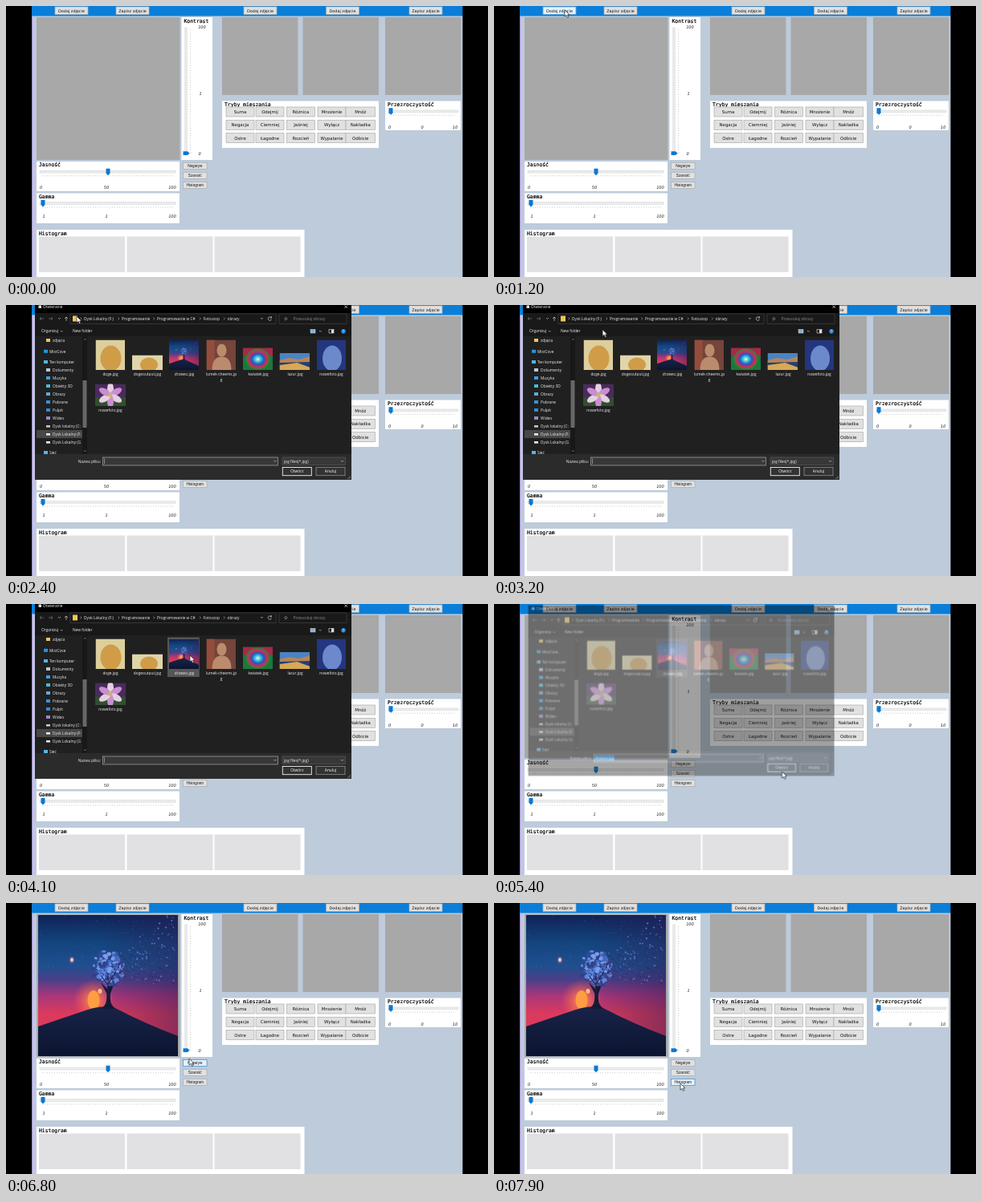
These frames come from a looping animation (600 px wide and 338 px high, 8 s). An HTML page:

```html
<!DOCTYPE html>
<html lang="pl">
<head>
<meta charset="utf-8">
<title>Edytor zdjęć</title>
<style>
html, body { margin: 0; width: 100%; height: 100%; overflow: hidden; background: #000; }
svg { display: block; }
#stage { width: 100vw; height: 100vh; }
text { white-space: pre; }
.wide { font-family: "DejaVu Sans", sans-serif; }
.ui { font-family: "Liberation Sans", Arial, sans-serif; }
.dlg { font-family: "Open Sans", "Noto Sans", sans-serif; }
.mono { font: 6.4px "DejaVu Sans Mono", monospace; stroke: #000; stroke-width: .2; }
.btn { fill: #e1e1e1; stroke: #adadad; stroke-width: .7; }
.scale { font: italic 5.1px "DejaVu Sans", sans-serif; fill: #222; }

/* one loop is 8 s: 1% = 80 ms */
#dialog, #cursor, #photo, #pick, #filename, .hot { animation: 8s linear infinite; }
#dialog { animation-name: dialog; transform-origin: 233px 108px; }
#cursor { animation-name: cursor; animation-timing-function: ease-in-out; }
#photo { animation-name: photo; animation-timing-function: step-end; }
#pick { animation-name: pick; animation-timing-function: step-end; }
#filename { animation-name: filename; animation-timing-function: step-end; }
.hot { fill: #e5f1fb; stroke: #3a93dc; stroke-width: .7; opacity: 0; animation-timing-function: step-end; }
#hot-add { animation-name: hot-add; }
#hot-neg { animation-name: hot-neg; }
#hot-gray { animation-name: hot-gray; }
#hot-hist { animation-name: hot-hist; }

@keyframes dialog {
  0%, 18.75% { opacity: 0; transform: scale(.94); }
  21%, 66.25% { opacity: 1; transform: none; }
  67.5% { opacity: .43; transform: scale(.967); }
  68.75%, 100% { opacity: 0; transform: scale(.935); }
}
@keyframes cursor {
  0%, 6% { transform: translate(150px, -14px); }
  12%, 22% { transform: translate(88px, 5px); }
  28%, 36% { transform: translate(88px, 14px); }
  46%, 54% { transform: translate(229px, 64px); }
  63%, 68.75% { transform: translate(358.5px, 209px); }
  80%, 87% { transform: translate(228px, 194px); }
  95%, 100% { transform: translate(232px, 225px); }
}
@keyframes photo { 0% { opacity: 0; } 70%, 100% { opacity: 1; } }
@keyframes pick {
  0% { opacity: 0; fill: #565656; }
  45.5% { opacity: 1; fill: #565656; }
  53%, 100% { opacity: 1; fill: #333; }
}
@keyframes filename { 0% { opacity: 0; } 53%, 100% { opacity: 1; } }
@keyframes hot-add { 0% { opacity: 0; } 11% { opacity: 1; } 19%, 100% { opacity: 0; } }
@keyframes hot-neg { 0% { opacity: 0; } 78.5% { opacity: 1; } 91%, 100% { opacity: 0; } }
@keyframes hot-gray { 0% { opacity: 0; } 91% { opacity: 1; } 93%, 100% { opacity: 0; } }
@keyframes hot-hist { 0% { opacity: 0; } 93%, 100% { opacity: 1; } }
</style>
</head>
<body>
<svg id="stage" viewBox="0 0 600 338" preserveAspectRatio="none">
  <defs>
    <linearGradient id="sky" x1="0" y1="0" x2="0" y2="1">
      <stop offset="0" stop-color="#0f2358"/>
      <stop offset=".2" stop-color="#14457f"/>
      <stop offset=".36" stop-color="#1f4f8e"/>
      <stop offset=".46" stop-color="#4b3f88"/>
      <stop offset=".57" stop-color="#a8367a"/>
      <stop offset=".7" stop-color="#dc3a5c"/>
    </linearGradient>
    <linearGradient id="dusk">
      <stop offset=".45" stop-color="#2a1c52" stop-opacity="0"/>
      <stop offset="1" stop-color="#2a1c52" stop-opacity=".45"/>
    </linearGradient>
    <linearGradient id="hill" x1="0" y1="0" x2="0" y2="1">
      <stop offset="0" stop-color="#182348"/>
      <stop offset="1" stop-color="#0c1430"/>
    </linearGradient>
    <radialGradient id="glow">
      <stop offset="0" stop-color="#ff9a52"/>
      <stop offset="1" stop-color="#ff5a50" stop-opacity="0"/>
    </radialGradient>
    <radialGradient id="bloom">
      <stop offset="0" stop-color="#f4f6d0"/>
      <stop offset=".25" stop-color="#38c4d8"/>
      <stop offset=".5" stop-color="#2356c4"/>
      <stop offset=".75" stop-color="#d12b50"/>
      <stop offset="1" stop-color="#1f8a3d"/>
    </radialGradient>
    <symbol id="scene" viewBox="0 0 174 176" preserveAspectRatio="none"></symbol>
  </defs>
  <g id="app"></g>
  <g id="dialog"></g>
  <path id="cursor" d="M0 0V8.2L2 6.4L3.4 9.4L4.8 8.8L3.5 5.9H6Z" fill="#fff" stroke="#222" stroke-width=".7"/>
  <path d="M0 0H32V338H0ZM568.4 0H600V338H568.4Z"/>
</svg>
<script>
const $ = id => document.getElementById(id);

const rect = (x, y, w, h, attrs = '') =>
  `<rect x="${x}" y="${y}" width="${w}" height="${h}" ${attrs}/>`;
const fill = (x, y, w, h, color) => rect(x, y, w, h, `fill="${color}"`);
const path = (d, attrs) => `<path d="${d}" ${attrs}/>`;
const line = (d, color, width = .7) =>
  path(d, `fill="none" stroke="${color}" stroke-width="${width}"`);
const ellipse = (x, y, rx, ry, color, attrs = '') =>
  `<ellipse cx="${x}" cy="${y}" rx="${rx}" ry="${ry}" fill="${color}" ${attrs}/>`;
const text = (s, x, y, cls, size, color = '#111', anchor = 'start') =>
  `<text x="${x}" y="${y}" class="${cls}" font-size="${size}" fill="${color}" text-anchor="${anchor}">${s}</text>`;
const mono = (s, x, y) => `<text x="${x}" y="${y}" class="mono">${s}</text>`;
const mark = (s, x, y) => `<text x="${x}" y="${y}" class="scale" text-anchor="middle">${s}</text>`;

function button(label, x, y, w, h, cls, size, hot) {
  return rect(x, y, w, h, 'class="btn"') +
    (hot ? rect(x, y, w, h, `class="hot" id="${hot}"`) : '') +
    text(label, x + w / 2, y + h / 2 + size * .36, cls, size, '#111', 'middle');
}

function slider(x1, x2, y, knob, marks, baseline, first = x1 + 1.5) {
  const places = [first, (x1 + x2) / 2 - 1.5, x2 - 4];
  return rect(x1, y - 1.2, x2 - x1, 2.4, 'fill="#eceeee" stroke="#d2d4d6" stroke-width=".6"') +
    path(`M${x1 + 3} ${y + 5}H${x2 - 3}`, 'stroke="#c4c4c4" stroke-width=".9" stroke-dasharray="1 2"') +
    path(`M${knob - 2.5} ${y - 4}h5v6l-2.5 2.5l-2.5 -2.5z`, 'fill="#0a78d2"') +
    marks.map((m, i) => mark(m, places[i], baseline)).join('');
}

function random(seed) {
  return () => (seed = seed * 16807 % 2147483647) / 2147483647;
}

function scene() {
  const rnd = random(4127);
  const many = (n, dot) => Array.from({ length: n }, dot).join('');
  const any = list => list[Math.floor(rnd() * list.length)];
  const stars = many(80, () =>
    ellipse(rnd() * 174, rnd() * 75, .45, .45, '#6fa6dc', `opacity="${.3 + rnd() * .5}"`));
  const drift = many(230, () => {
    const t = rnd(), r = .4 + rnd() * .7;
    return ellipse(98 + t * 72, 66 - t * 26 + (rnd() - .5) * (30 + t * 70), r, r,
      any(['#5f78c4', '#2a2f66', '#4a3f80']));
  });
  const crown = many(170, () => {
    const a = rnd() * 6.283, d = Math.sqrt(rnd());
    return ellipse(87 + Math.cos(a) * d * 19, 66 + Math.sin(a) * d * 22, 1.3 + rnd() * 2, 1.2 + rnd() * 1.8,
      any(['#2f4a98', '#4468bc', '#5f86dc', '#7c9cec', '#343f86']));
  });
  return fill(0, 0, 174, 176, 'url(#sky)') + fill(0, 0, 174, 176, 'url(#dusk)') + stars +
    ellipse(42, 56, 3.5, 4.5, '#e06c9c', 'opacity=".3"') + ellipse(42, 56, 1.8, 2.4, '#ffcfc6') +
    ellipse(69, 107, 26, 27, 'url(#glow)') + ellipse(69, 106, 7.5, 12, '#ff9d43') +
    ellipse(77, 95, 2.5, 3, '#ffc075') +
    path('M0 139Q35 127 62 118Q84 111 98 117Q130 134 174 151V176H0Z', 'fill="url(#hill)"') +
    path('M78 117Q87 112 85 97L78 84L86 92L87 70L89 90L97 78L90 98Q88 112 97 117Z', 'fill="#141936"') +
    crown + line('M87 100V72M87 88L78 75M88 85L97 70', '#1d2450', 1.1) + drift;
}

function app() {
  let s = fill(32, 0, 537, 338, '#bdcbdb') + fill(32, 0, 537, 12.5, '#0a7ed8') +
    fill(32, 12.5, 1, 326, '#a886d4');

  [['Dodaj zdjęcie', 61, 'hot-add'], ['Zapisz zdjęcie', 137], ['Dodaj zdjęcie', 296],
   ['Dodaj zdjęcie', 398.5], ['Zapisz zdjęcie', 502]].forEach(([label, x, hot]) => {
    s += button(label, x, 1, 41, 9.6, 'wide', 4.9, hot);
  });

  s += fill(38, 14, 178.5, 178, '#a8a8a8');
  [269, 369.5, 472].forEach(x => s += fill(x, 14, 94.5, 97, '#a8a8a8'));
  s += '<use id="photo" href="#scene" x="40" y="15" width="174" height="176"/>';

  s += fill(218.5, 14, 38.5, 178, '#fff') + mono('Kontrast', 221.5, 21) +
    rect(222.8, 27, 2.4, 159, 'fill="#eceeee" stroke="#d2d4d6" stroke-width=".6"') +
    path('M229.5 29V183', 'stroke="#c4c4c4" stroke-width=".9" stroke-dasharray="1 2"') +
    path('M220.5 181.3h5.5l2.6 2.4l-2.6 2.4h-5.5z', 'fill="#0a78d2"') +
    mark('100', 244, 27.5) + mark('1', 242, 110.5) + mark('0', 241, 186);

  s += fill(38, 194, 178, 37, '#fff') + mono('Jasność', 41, 200) +
    slider(42, 211, 206.8, 127, [0, 50, 100], 228);
  s += fill(38, 233.5, 178, 37.5, '#fff') + mono('Gamma', 41, 239.5) +
    slider(42, 211, 246, 46, [1, 1, 100], 264, 47);

  [['Negatyw', 'neg'], ['Szarość', 'gray'], ['Histogram', 'hist']].forEach(([label, id], i) => {
    s += button(label, 220.5, 195.5 + i * 12, 29.5, 8, 'ui', 4.7, 'hot-' + id);
  });

  s += fill(38, 279, 333.5, 59, '#fff') + mono('Histogram', 41, 285.5);
  [41, 150.5, 259.5].forEach(x => s += fill(x, 287.5, 107, 44.5, '#e1e0e2'));

  s += fill(269, 118.5, 195, 58.5, '#fff') + mono('Tryby mieszania', 272, 125);
  const columns = [274, 311, 349.5, 388, 423];
  ['Suma Odejmij Różnica Mnożenie Mnóż', 'Negacja Ciemniej Jaśniej Wyłącz Nakładka',
   'Ostre Łagodne Rozcień Wypalanie Odbicie'].forEach((row, r) =>
    row.split(' ').forEach((label, c) => {
      s += button(label, columns[c], 126 + r * 16.3, c === 4 ? 36.5 : 35, 12, 'wide', 5.4);
    }));

  return s + fill(472, 118.5, 94, 36.5, '#fff') + mono('Przezroczystość', 475, 125) +
    slider(476, 563, 131.2, 479, [0, 0, 10], 153);
}

const thumb = (x, y, w, h, art) =>
  `<svg x="${x}" y="${y}" width="${w}" height="${h}" viewBox="0 0 ${w} ${h}">${art}</svg>`;

function thumbs() {
  const petals = [0, 60, 120, 180, 240, 300].map(a =>
    ellipse(19, 6, 4, 8, a % 120 ? '#c98fd0' : '#e6cfe4', `transform="rotate(${a} 19 14)"`)).join('');
  return thumb(111.5, 43.5, 36.5, 37.5, fill(0, 0, 37, 38, '#dccf9c') + ellipse(19, 23, 13, 16, '#d09c48')) +
    thumb(157, 62.5, 38, 18.5, fill(0, 0, 38, 19, '#e0d4aa') + ellipse(21, 12, 11, 9, '#d09c48')) +
    '<use href="#scene" x="203" y="44" width="37" height="37"/>' +
    thumb(249.5, 43.5, 36.5, 37.5, fill(0, 0, 37, 38, '#75443a') + fill(0, 0, 10, 38, '#934d3c') +
      ellipse(19, 13, 6, 8, '#bb8b6e') + path('M7 38Q7 21 19 21T31 38Z', 'fill="#bb8b6e"')) +
    thumb(295, 53.5, 37, 27.5, fill(0, 0, 37, 28, '#197a3a') + fill(0, 0, 37, 10, '#a92848') +
      ellipse(18.5, 14, 15, 13, 'url(#bloom)')) +
    thumb(340.5, 60, 37.5, 21, fill(0, 0, 38, 21, '#4a83c5') + path('M0 9L12 6L24 8L38 4V14H0Z', 'fill="#b98455"') +
      path('M0 12L38 11V21H0Z', 'fill="#243f78"') + path('M0 15L22 12L38 18V21H0Z', 'fill="#d6a858"')) +
    thumb(387, 43.5, 36, 37.5, fill(0, 0, 36, 38, '#23367e') + ellipse(19, 23, 12, 16, '#6c89cc')) +
    thumb(111, 98.5, 38, 27.5, fill(0, 0, 38, 28, '#4a2b5c') + fill(0, 17, 38, 11, '#31502e') +
      petals + ellipse(19, 14, 2.5, 2.5, '#c5bd4a'));
}

function dialog() {
  const t = (s, x, y, color = '#eee', anchor) => text(s, x, y, 'dlg', 4.8, color, anchor);
  let s = fill(36, -2, 394, 220, '#202020') + fill(36, -2, 394, 12, '#000') +
    fill(36, 10, 394, 29, '#191919') + fill(36, 186, 394, 32, '#2b2b2b');

  s += fill(40.5, .5, 3.5, 3.5, '#ddd') + t('Otwieranie', 46, 4.3) +
    line('M421.5 .5l3.5 3.5m0 -3.5l-3.5 3.5', '#eee');
  s += line('M47 17h-5m2 -2l-2 2l2 2M53 17h5m-2 -2l2 2l-2 2', '#777') +
    line('M65 16l1.5 1.5l1.5 -1.5M75 20v-5m-2 2l2 -2l2 2', '#ccc');
  s += rect(80, 11, 256, 12.5, 'fill="#191919" stroke="#484848" stroke-width=".6"') +
    fill(83, 13.5, 6, 7, '#f0c65a');
  [['Dysk Lokalny (F:)', 97], ['Programowanie', 144], ['Programowanie w C#', 188],
   ['Fotoszop', 245.5], ['obrazy', 275.5]].forEach(([label, x]) => {
    s += t(label, x, 18.6) + line(`M${x - 4.5} 15.5l1.5 1.5l-1.5 1.5`, '#bbb', .6);
  });
  s += line('M317 16l1.5 1.5l1.5 -1.5', '#ccc') +
    line('M330 15.6a2.2 2.2 0 1 0 .5 2M330.5 14v2h-2', '#ccc') +
    rect(340, 11, 84, 12.5, 'fill="#191919" stroke="#484848" stroke-width=".6"') +
    line('M349.5 16a1.5 1.5 0 1 1 -.1 -.1M349.3 17.4l-2 2', '#999') +
    t('Przeszukaj obrazy', 357.5, 18.6, '#8c8c8c');

  s += t('Organizuj', 44, 34.3) + line('M68 32l1.3 1.3l1.3 -1.3', '#ccc') + t('New folder', 83, 34.3) +
    rect(379, 30.5, 6, 4.5, 'fill="#7eb1dc" stroke="#ddd" stroke-width=".5"') +
    line('M390 32l1.3 1.3l1.3 -1.3', '#ccc') +
    rect(402, 30.5, 6, 4.5, 'fill="none" stroke="#ddd" stroke-width=".6"') + fill(405, 30.5, 3, 4.5, '#ddd') +
    ellipse(420, 32.8, 2.8, 2.8, '#2386d8') + t('?', 420, 34.5, '#fff', 'middle');

  s += fill(38, 156, 57, 10, '#484848') + fill(95, 39, 6, 147, '#181818') +
    fill(95.5, 94, 5, 59, '#686868') + line('M97 43.5l1.3 -1.3l1.3 1.3M97 181.5l1.3 1.3l1.3 -1.3', '#aaa');
  [['zdjęcia', 46, '#f0c65a'], ['MistCove', 59.8, '#2594e0', 1], ['Ten komputer', 73, '#55b4e8', 1],
   ['Dokumenty', 83, '#b9c8d4'], ['Muzyka', 93, '#3b9fe8'], ['Obiekty 3D', 103, '#45bcd8'],
   ['Obrazy', 113, '#62a8d8'], ['Pobrane', 123, '#3590e0'], ['Pulpit', 133, '#2c8ddc'],
   ['Wideo', 143, '#9b87c5'], ['Dysk lokalny (C:', 153, '#c8c8c8'], ['Dysk Lokalny (F:', 163, '#e8e8e8'],
   ['Dysk Lokalny (G', 173, '#e8e8e8'], ['Sieć', 186, '#55b4e8', 1]].forEach(([label, y, color, root]) => {
    const drive = label.startsWith('Dysk');
    s += fill(root ? 47 : 50, y - (drive ? 3 : 4), 5, drive ? 2.6 : 4, color) + t(label, root ? 54 : 58, y);
  });
  s += fill(36, 186, 394, 3, '#2b2b2b');

  s += rect(201, 41.5, 39.8, 49.5, 'id="pick"') + thumbs();
  [['doge.jpg', 130], ['dogeoutput.jpg', 176], ['drzewo.jpg', 222], ['lumek-cheems.jp', 268],
   ['kwiatek.jpg', 314], ['lazur.jpg', 360], ['nowefoto.jpg', 405]].forEach(([label, x]) => {
    s += t(label, x, 87.6, '#eee', 'middle');
  });
  s += t('g', 268, 94.6, '#eee', 'middle') + t('nowefoto.jpg', 130, 133.4, '#eee', 'middle');

  const field = 'fill="#383838" stroke="#a8a8a8" stroke-width=".7"';
  s += t('Nazwa pliku:', 118, 196.7, '#eee', 'end') + rect(120.5, 190, 218, 10, field) +
    line('M122.5 191.5v6.5', '#ddd', .5) + line('M333.5 194l1.5 1.5l1.5 -1.5', '#ccc') +
    `<g id="filename">${fill(121.5, 191.2, 25.5, 7.4, '#0a78d2') + t('drzewo.jpg', 122, 196.7, '#fff')}</g>` +
    rect(344, 190, 78.5, 9.5, 'fill="#383838" stroke="#606060" stroke-width=".6"') +
    t('jpg files(*.jpg)', 346, 196.7) + line('M417 194l1.5 1.5l1.5 -1.5', '#ccc');
  s += rect(344.3, 202.5, 36, 10.2, 'fill="#333" stroke="#f2f2f2" stroke-width=".9"') +
    t('Otwórz', 362.3, 209.3, '#fff', 'middle') +
    rect(386, 202.5, 36, 10.2, 'fill="#333" stroke="#9b9b9b" stroke-width=".7"') +
    t('Anuluj', 404, 209.3, '#fff', 'middle');
  return s + line('M425 217l4 -4M427 217l2 -2', '#999', .6);
}

$('scene').innerHTML = scene();
$('app').innerHTML = app();
$('dialog').innerHTML = dialog();
</script>
</body>
</html>
```
